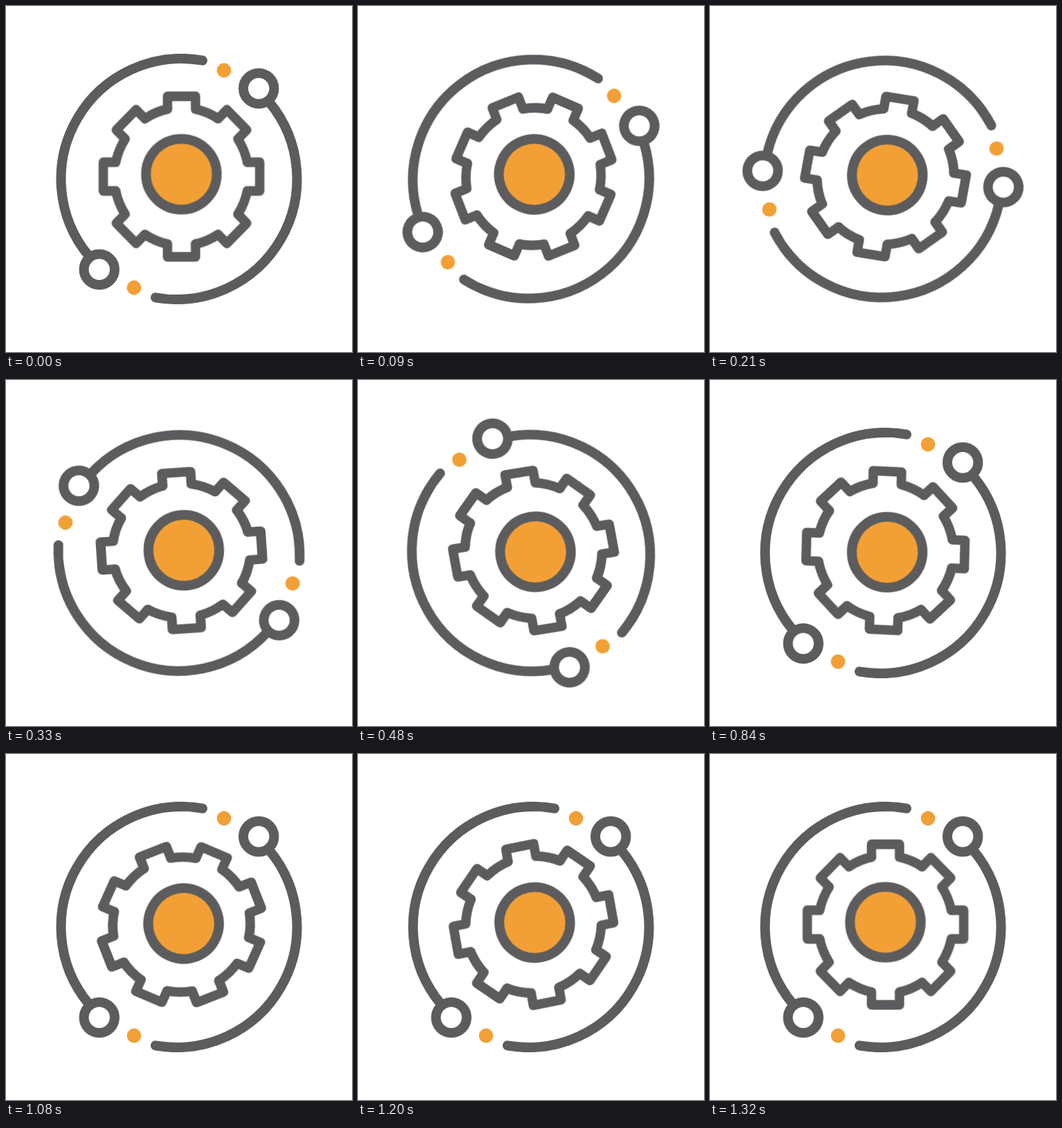
Write an HTML page without scripts that moves like this. It is 500 px wide and 500 px high and loops after 1.68 s.

```html
<!DOCTYPE html>
<html lang="en">
<head>
<meta charset="utf-8">
<title>Turning gear</title>
<style>
  html, body { margin: 0; width: 100%; height: 100%; overflow: hidden; background: #fff; }
  svg { display: block; width: 100%; height: 100%; }
  .line { fill: none; stroke: #5c5c5e; stroke-width: 14; stroke-linecap: round; stroke-linejoin: round; }
  .teeth { stroke-width: 13.7; }
  .dot { fill: #f2a035; }
  .hub { fill: #f2a035; }

  /* 1ms lead keeps each 30ms step clear of its boundary */
  .orbit { animation: orbit 1680ms -1ms infinite; }
  .gear { animation: swing 1680ms -1ms infinite; }

  /* half a turn in 720ms, then rest */
  @keyframes orbit {
    0% { transform: rotate(0deg); animation-timing-function: steps(24); }
    42.857143%, 100% { transform: rotate(180deg); }
  }
  /* out in 690ms, back by 1320ms, then rest */
  @keyframes swing {
    0% { transform: rotate(0deg); animation-timing-function: steps(23); }
    41.071429% { transform: rotate(180deg); animation-timing-function: steps(21); }
    78.571429%, 100% { transform: rotate(0deg); }
  }
</style>
</head>
<body>
<svg viewBox="0 0 500 500">
  <defs>
    <g id="arm">
      <path class="line" d="M34 -171.3A174 174 0 0 0 -130.5 111"/>
      <circle class="line" cx="-115.2" cy="130.8" r="22.2"/>
      <circle class="dot" cx="65" cy="-157" r="10.4"/>
    </g>
    <path id="tooth" d="M-20.5 -96.3V-114.5H20.5V-96.3A98.5 98.5 0 0 1 53.65 -82.6"/>
    <g id="pair">
      <use href="#tooth"/>
      <use href="#tooth" transform="rotate(45)"/>
    </g>
  </defs>

  <g transform="translate(250 250)">
    <g class="orbit">
      <use href="#arm"/>
      <use href="#arm" transform="rotate(180)"/>
    </g>
  </g>

  <g transform="translate(253.6 246.5)">
    <g class="gear">
      <g class="line teeth" transform="scale(.987 1.013)">
        <use href="#pair"/>
        <use href="#pair" transform="rotate(90)"/>
        <use href="#pair" transform="rotate(180)"/>
        <use href="#pair" transform="rotate(270)"/>
      </g>
      <circle class="line" style="fill:#f2a035" cx="-.2" cy="-3.4" r="51.2"/>
    </g>
  </g>
</svg>
</body>
</html>
```
